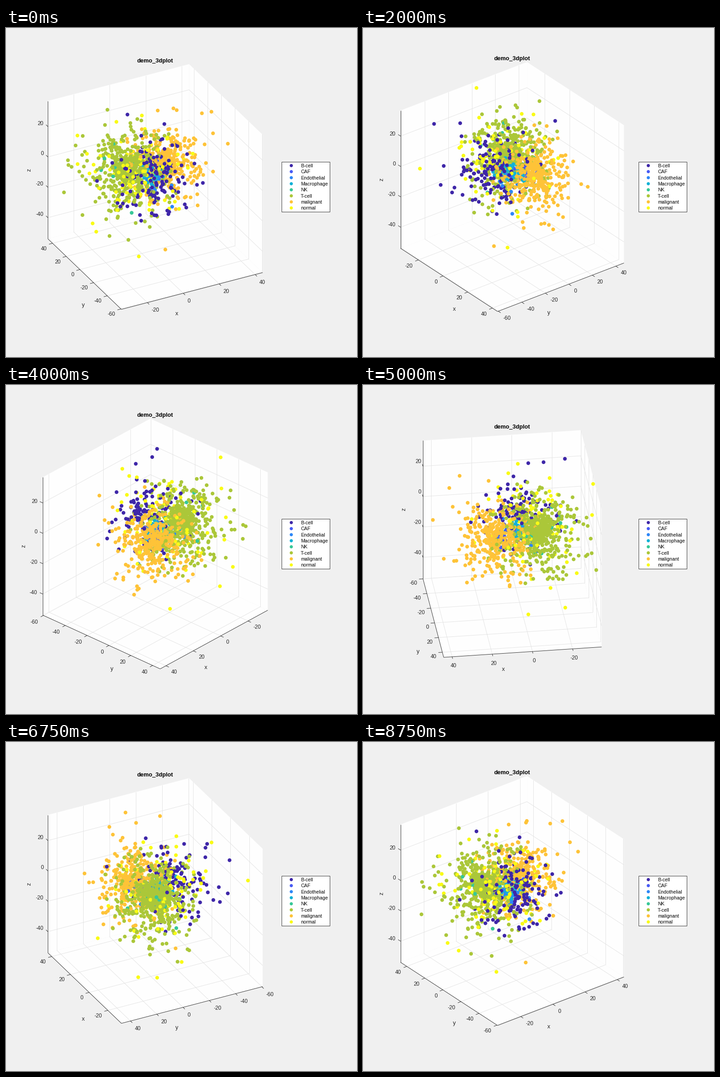
A matplotlib script that plays this animation: 773 px wide and 725 px high, repeating every 9 s.

```python
import numpy as np
import matplotlib.pyplot as plt
from matplotlib.animation import FuncAnimation

W, H, DPI = 773, 725, 100
PX = 72 / DPI                      # points per pixel
CX, CY, R = 328.7, 349.8, 175.4    # cube centre and half side in pixels
FRAMES, STEP, AZ0 = 36, 10, -27.5
SIN_EL, COS_EL = 0.5, np.sqrt(0.75)
LIMITS = [(-34.45, 44.2), (-60.6, 46.9), (-53.9, 36.9)]
TICKS = [np.arange(-20, 41, 20), np.arange(-60, 41, 20), np.arange(-40, 21, 20)]
INK, GRID, PAPER = "#262626", "#e2e2e2", "#f0f0f0"

plt.rcParams["font.family"] = "Liberation Sans"

# name, colour, centre, wide (count, spread), core (count, spread)
GROUPS = [
    ("B-cell", "#3e26a8", (-25, -40, 46), (98, 45), (28, 20)),
    ("CAF", "#475bf5", (28, 20, 34), (5, 20), (10, 9)),
    ("Endothelial", "#2d87f7", (-10, -6, 33), (7, 26), (10, 13)),
    ("Macrophage", "#12b1d6", (-10, -6, 34), (15, 23), (30, 11)),
    ("NK", "#37c897", (-50, 25, 42), (10, 34), (2, 10)),
    ("T-cell", "#abc739", (-55, 29, 42), (330, 45), (210, 16)),
    ("malignant", "#fec338", (37, 32, 35), (250, 42), (110, 16)),
    ("normal", "#f9fb15", (-36, 0, 44), (62, 52), (22, 26)),
]

# isolated cells, in cube pixels
LONERS = {
    "B-cell": [(-5, 123, 122), (-142, 5, 50), (51, -54, 97), (63, -78, 28),
               (8, -19, 129), (-29, 11, 132), (39, -73, -26), (-63, -54, -42)],
    "Endothelial": [(30, -23, -47)],
    "T-cell": [(-173, 103, -21), (-175, 11, -31), (-87, -39, -92),
               (-112, 3, -97), (-35, -41, -72), (-151, 124, 32), (-154, 84, 103)],
    "malignant": [(-1, -50, -134), (140, 1, 153), (175, -10, 68), (85, 61, 141),
                  (40, 65, 150), (55, 19, 175), (108, -68, 142),
                  (155, 22, -14), (105, 33, -72)],
    "normal": [(-34, 13, -175), (-106, -175, 59), (-175, 35, 159), (-172, 40, 83),
               (-14, 37, 166), (-47, 95, 129), (-105, 97, -115), (-62, 175, -17)],
}


def make_cells():
    rng = np.random.default_rng(12)
    pts, cols = [], []
    for name, color, centre, *parts in GROUPS:
        for count, spread in parts:
            noise = np.clip(rng.normal(size=(count, 3)), -2.4, 2.4)
            pts.append(np.array(centre) + spread * noise)
            cols += [color] * count
        if name in LONERS:
            pts.append(np.array(LONERS[name], float))
            cols += [color] * len(LONERS[name])
    return np.vstack(pts), np.array(cols)


CELLS, COLORS = make_cells()

fig = plt.figure(figsize=(W / DPI, H / DPI), dpi=DPI, facecolor=PAPER)
ax = fig.add_axes([0, 0, 1, 1])


def project(p, az):
    """Orthographic view: screen position and nearness."""
    x, y, z = np.moveaxis(np.asarray(p, float), -1, 0)
    c, s = np.cos(az), np.sin(az)
    away = y * c - x * s
    pos = np.stack([CX + x * c + y * s, CY - SIN_EL * away - COS_EL * z], -1)
    return pos, z * SIN_EL - away * COS_EL


def to_cube(axis, value):
    lo, hi = LIMITS[axis]
    return ((value - lo) / (hi - lo) * 2 - 1) * R


def text(x, y, s, size, ha="center", drop=0.36, **kw):
    kw.setdefault("color", INK)
    ax.text(x, y + drop * size, s, fontsize=size * PX, ha=ha, va="baseline", **kw)


def line(pts, color, z):
    ax.plot(*np.asarray(pts).T, color=color, lw=0.9 * PX, zorder=z,
            solid_capstyle="butt")


def unit(v):
    return v / np.hypot(*v)


def draw_walls(az, fx, fy):
    back = (-fx * R, -fy * R, -R)
    for axis in range(3):
        a, b = [i for i in range(3) if i != axis]
        quad = np.zeros((4, 3))
        quad[:, axis] = back[axis]
        quad[:, a] = np.array([-1, 1, 1, -1]) * R
        quad[:, b] = np.array([-1, -1, 1, 1]) * R
        ax.fill(*project(quad, az)[0].T, color="#fefefe", lw=0, zorder=1)
        for along, across in ((a, b), (b, a)):
            for t in TICKS[along]:
                seg = np.zeros((2, 3))
                seg[:, axis] = back[axis]
                seg[:, along] = to_cube(along, t)
                seg[:, across] = -R, R
                line(project(seg, az)[0], GRID, 2)


def draw_axis(az, axis, base, out):
    """Ruler along one cube edge, with ticks pointing to `out`."""
    ends = np.array([base, base], float)
    ends[:, axis] = -R, R
    line(project(ends, az)[0], INK, 3)
    for t in TICKS[axis]:
        p = np.array(base, float)
        p[axis] = to_cube(axis, t)
        a, b = project([p, p + 0.05 * R * np.array(out)], az)[0]
        line([a, b], INK, 3)
        nx, ny = unit(b - a)
        if axis == 2:
            ha, dy = "right", 13 * ny + 1.2
        else:
            ha = "left" if nx > 0.5 else "right" if nx < -0.5 else "center"
            dy = 8 + 11.8 * ny
        text(a[0] + 13 * nx, a[1] + dy, str(t), 11.7, ha, zorder=4)


def draw_name(az, axis, name, front):
    """Axis name, shifted towards the front corner."""
    ends = np.array([front, front], float)
    ends[1, axis] *= -1
    near, far = project(ends, az)[0]
    e = unit(near - far)
    down = np.array([-e[1], e[0]])
    down *= np.sign(down[1])
    steep = abs(e[1])
    shift = 45 + 85 * max(0, steep - 0.75)
    gap = min(33 + 27 * steep, 52)
    x, y = (near + far) / 2 + e * shift + down * gap
    text(x, y, name, 12.8, drop=0.28, zorder=4)


def draw_axes(az, fx, fy):
    front = (fx * R, fy * R, -R)
    draw_axis(az, 0, front, (0, fy, 0))
    draw_axis(az, 1, front, (fx, 0, 0))
    sides = [((-fx * R, fy * R, 0), (-fx, 0, 0)), ((fx * R, -fy * R, 0), (0, -fy, 0))]
    base, out = min(sides, key=lambda side: project(side[0], az)[0][0])
    draw_axis(az, 2, base, out)
    draw_name(az, 0, "x", front)
    draw_name(az, 1, "y", front)
    x, y = project(base, az)[0]
    ax.text(x - 41, y, "z", fontsize=12.8 * PX, color=INK, rotation=90,
            ha="center", va="center", zorder=4)


def dots(xy, colors, size):
    ax.scatter(*np.asarray(xy).T, s=(size * PX) ** 2, c=colors, linewidths=0, zorder=5)


def draw_legend():
    ax.add_patch(plt.Rectangle((607, 295), 106, 110, fc="white", ec=INK,
                               lw=0.9 * PX, zorder=4))
    ys = 303.2 + 13.33 * np.arange(len(GROUPS))
    dots([(628.3, y) for y in ys], [g[1] for g in GROUPS], 7)
    for y, group in zip(ys, GROUPS):
        text(649, y, group[0], 10.6, "left", color="black", zorder=5)


def draw(i):
    az = np.radians(AZ0 + STEP * i)
    fx, fy = np.sign(np.sin(az)), -np.sign(np.cos(az))
    ax.clear()
    ax.set(xlim=(0, W), ylim=(H, 0))
    ax.axis("off")
    draw_walls(az, fx, fy)
    draw_axes(az, fx, fy)
    pos, near = project(CELLS, az)
    order = np.argsort(near)
    dots(pos[order], COLORS[order], 8.2)
    top = project((-fx * R, -fy * R, R), az)[0][1]
    text(CX, top - 8.5, "demo_3dplot", 12.8, color="black", weight="bold")
    draw_legend()
    return []


anim = FuncAnimation(fig, draw, frames=FRAMES, interval=250, init_func=lambda: [],
                     repeat=True, repeat_delay=0)
plt.show()
```
